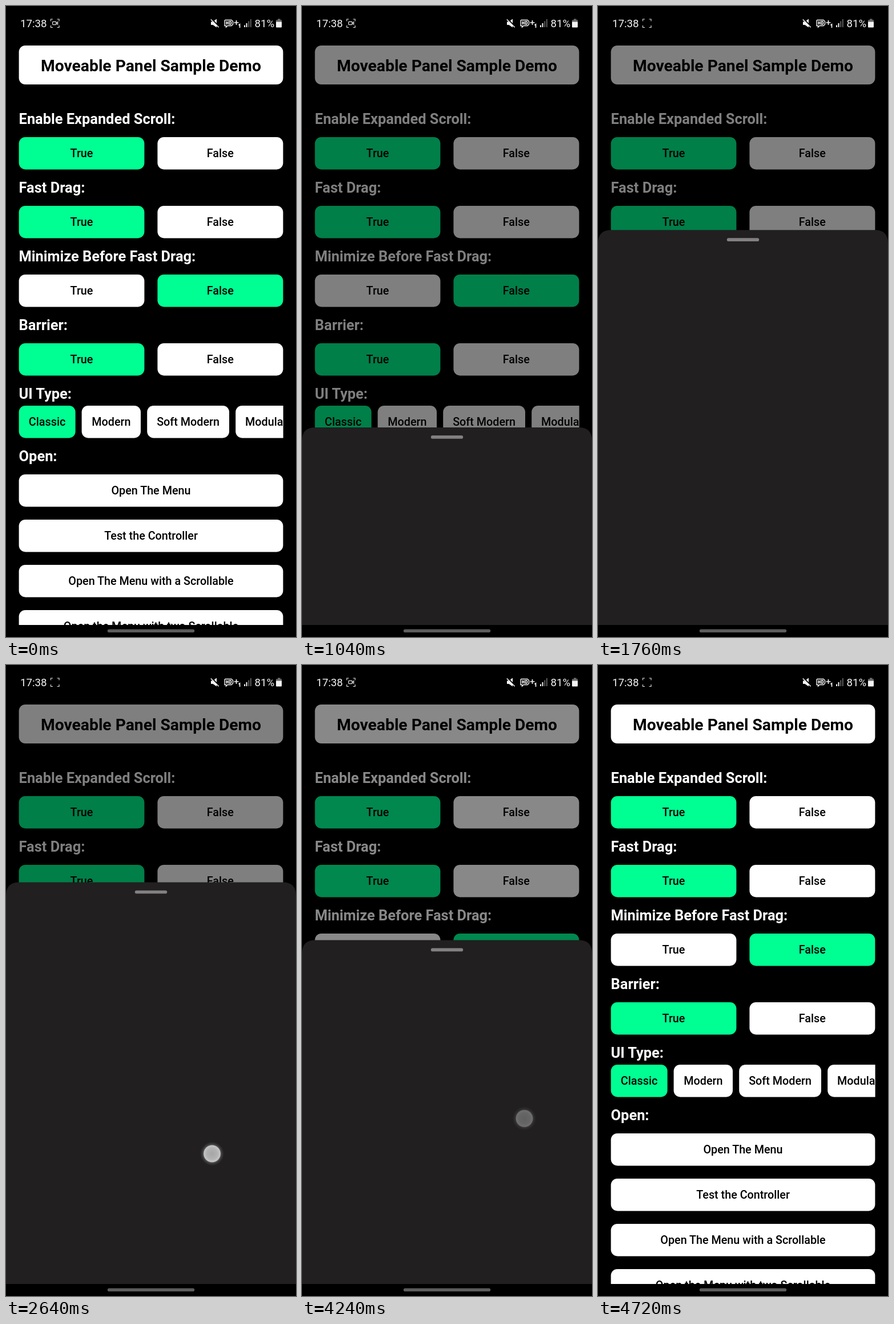
These frames come from a looping animation (508 by 1102 pixels, 4800 ms). An HTML page:

```html
<!DOCTYPE html>
<html lang="en">
<head>
<meta charset="utf-8">
<title>Sliding sheet</title>
<style>
  html, body { margin: 0; width: 100%; height: 100%; overflow: hidden; background: #000; }
  svg { display: block; width: 100%; height: 100%; font-family: Roboto, "Open Sans", sans-serif; }
  .title { font-size: 28.22px; font-weight: 700; text-anchor: middle; }
  .head { font-size: 25.4px; font-weight: 700; fill: #fff; }
  .label { font-size: 19.75px; font-weight: 500; text-anchor: middle; }
  .status { font-size: 18.7px; fill: #f4f4f4; }
</style>
</head>
<body>
<svg viewBox="0 0 508 1102">
  <defs>
    <clipPath id="pageClip"><rect width="508" height="1081"/></clipPath>
    <clipPath id="rowClip"><rect x="22" y="690" width="463.6" height="70"/></clipPath>
    <radialGradient id="touch">
      <stop offset="0" stop-color="#a6a6a6"/>
      <stop offset=".45" stop-color="#b2b2b2"/>
      <stop offset=".68" stop-color="#c6c6c6"/>
      <stop offset=".74" stop-color="#aaa" stop-opacity=".34"/>
      <stop offset=".85" stop-color="#999" stop-opacity=".17"/>
      <stop offset="1" stop-color="#888" stop-opacity="0"/>
    </radialGradient>
  </defs>
  <rect width="508" height="1102"/>

  <g clip-path="url(#pageClip)">
    <g id="page"></g>
    <g id="chips" clip-path="url(#rowClip)"></g>
    <rect id="barrier" y="46" width="508" height="1035"/>
    <g id="sheet">
      <path d="M0 1100V23Q0 0 23 0H485Q508 0 508 23V1100Z" fill="#211f20"/>
      <rect x="225.8" y="14.1" width="56.4" height="5.64" rx="2.82" fill="#828081"/>
    </g>
    <circle id="dot" r="21" fill="url(#touch)"/>
  </g>

  <rect x="177.8" y="1088.4" width="152.4" height="5.64" rx="2.82" fill="#5c5c5c"/>

  <g id="bar">
    <text class="status" x="25" y="36.7">17:38</text>
    <path d="M78.5 26.5V23H82M89.5 23H93V26.5M93 34V37.5H89.5M82 37.5H78.5V34"
      fill="none" stroke="#ddd" stroke-width="1.2"/>
    <g id="camera" fill="none" stroke="#ddd" stroke-width="1.3">
      <rect x="81.6" y="27.4" width="6.2" height="5.2" rx="1"/>
      <path d="M88 29.5L90.6 28V32L88 30.7"/>
    </g>
    <path d="M359 27.5H362.5L369 22.5V37.5L362.5 33H359Z" fill="#f4f4f4"/>
    <path d="M359.5 22L374 36.5" stroke="#000" stroke-width="2"/>
    <path d="M358.8 23.5L372.6 37.2" stroke="#f4f4f4" stroke-width="1.6"/>
    <path d="M384 24.5H395L397.5 27V32L395 34.5H388L385.5 37V34.5H383V25.5Z"
      fill="none" stroke="#f4f4f4" stroke-width="1.4"/>
    <path d="M386 26.5V32.5M389 26.5V32.5M386 29.5H389M391.5 27V32H393.5L394.5 31V28L393.5 27Z"
      fill="none" stroke="#f4f4f4" stroke-width="1.5"/>
    <path d="M399.5 29H407.5M403.5 25V33M407.5 33.5L409.5 32V38"
      fill="none" stroke="#f4f4f4" stroke-width="1.7"/>
    <g fill="#f4f4f4">
      <rect x="417" y="33.5" width="2" height="3.5"/>
      <rect x="420.5" y="30" width="2" height="7"/>
      <rect x="424.2" y="26.5" width="2" height="10.5" opacity=".38"/>
      <rect x="427.8" y="23" width="2" height="14" opacity=".38"/>
    </g>
    <text class="status" x="435.5" y="36.7">81%</text>
    <path d="M476 22.5H480.5V24.5H483V27.5H473V24.5H476Z" fill="#6c6c6c"/>
    <path d="M473 27.5H483V36.5Q483 37.5 482 37.5H474Q473 37.5 473 36.5Z" fill="#f4f4f4"/>
  </g>
</svg>

<script>
const LOOP = 4800, STEP = 80;
const GREEN = '#00ff92', WHITE = '#fff';
const $ = id => document.getElementById(id);

function add(parent, tag, attrs, text) {
  const el = document.createElementNS('http://www.w3.org/2000/svg', tag);
  for (const key in attrs) el.setAttribute(key, attrs[key]);
  if (text) el.textContent = text;
  parent.append(el);
}

function button(parent, x, y, width, text, fill = WHITE) {
  add(parent, 'rect', { x, y, width, height: 56.4, rx: 11.3, fill });
  add(parent, 'text', { class: 'label', x: x + width / 2, y: y + 35 }, text);
}

function heading(y, text) {
  add($('page'), 'text', { class: 'head', x: 22.6, y }, text);
}

function buildPage() {
  const page = $('page');
  add(page, 'rect', { x: 22.6, y: 69, width: 462.8, height: 68, rx: 11.3, fill: WHITE });
  add(page, 'text', { class: 'title', x: 254, y: 113.5 }, 'Moveable Panel Sample Demo');

  const options = [
    ['Enable Expanded Scroll:', true],
    ['Fast Drag:', true],
    ['Minimize Before Fast Drag:', false],
    ['Barrier:', true]
  ];
  options.forEach(([name, on], i) => {
    const y = 229 + i * 120;
    heading(y - 22.6, name);
    button(page, 22.6, y, 219.8, 'True', on ? GREEN : WHITE);
    button(page, 265.4, y, 220, 'False', on ? WHITE : GREEN);
  });

  heading(686.4, 'UI Type:');
  const chips = [['Classic', 22.6, 99], ['Modern', 132.6, 103.4],
    ['Soft Modern', 247.2, 143.8], ['Modular', 402.2, 107]];
  chips.forEach(([name, x, w], i) => button($('chips'), x, 698, w, name, i ? WHITE : GREEN));

  heading(795.4, 'Open:');
  ['Open The Menu', 'Test the Controller', 'Open The Menu with a Scrollable',
    'Open the Menu with two Scrollable'
  ].forEach((name, i) => button(page, 22.6, 818 + i * 79, 462.8, name));
}

const line = p => p;
const quad = p => 1 - (1 - p) ** 2;
const cubic = p => 1 - (1 - p) ** 3;

// Each row: time, value, easing used to arrive there.
const sheetY = [
  [0, 1085], [544, 1081], [1040, 736, cubic],
  [1200, 736], [1280, 724.5], [1360, 665], [1800, 391, cubic],
  [2560, 391], [2640, 379.6], [2720, 320], [3120, 46.3, cubic],
  [4080, 46.3], [4160, 200], [4240, 480.5], [4560, 1085, quad]
];
const dim = [
  [0, 0], [544, 0], [1040, .5, cubic], [4160, .5], [4240, .466], [4720, 0, quad]
];

// Rows of time, x, y; each touch fades on its last step.
const touches = [
  [[160, 340, 846], [400, 340, 846]],
  [[1200, 352, 909], [1280, 355, 874], [1360, 359, 812], [1440, 362, 770]],
  [[2560, 358, 889], [2640, 361, 853.5], [2720, 365, 795], [2800, 368, 755]],
  [[4080, 383, 470], [4160, 386, 625], [4240, 389.5, 792]]
];

function at(track, t, col = 1) {
  const i = track.findIndex(row => row[0] > t);
  if (i < 0) return track[track.length - 1][col];
  if (i === 0) return track[0][col];
  const a = track[i - 1], b = track[i];
  const ease = typeof b[2] === 'function' ? b[2] : line;
  return a[col] + (b[col] - a[col]) * ease((t - a[0]) / (b[0] - a[0]));
}

function drawTouch(t) {
  const dot = $('dot');
  const path = touches.find(p => t >= p[0][0] && t < p[p.length - 1][0] + STEP);
  if (!path) return dot.setAttribute('opacity', 0);
  const released = t >= path[path.length - 1][0];
  dot.setAttribute('opacity', released ? .48 : 1);
  dot.setAttribute('cx', at(path, t, 1));
  dot.setAttribute('cy', at(path, t, 2));
}

function draw(now) {
  const t = Math.floor((now % LOOP) / STEP) * STEP;
  $('sheet').setAttribute('transform', `translate(0 ${at(sheetY, t).toFixed(2)})`);
  $('barrier').setAttribute('opacity', at(dim, t).toFixed(3));
  $('camera').setAttribute('opacity', (t + 215) % 1010 < 505 ? 1 : 0);
  drawTouch(t);
}

buildPage();
draw(0);
const start = performance.now();
(function tick() {
  draw(performance.now() - start);
  requestAnimationFrame(tick);
})();
</script>
</body>
</html>
```
